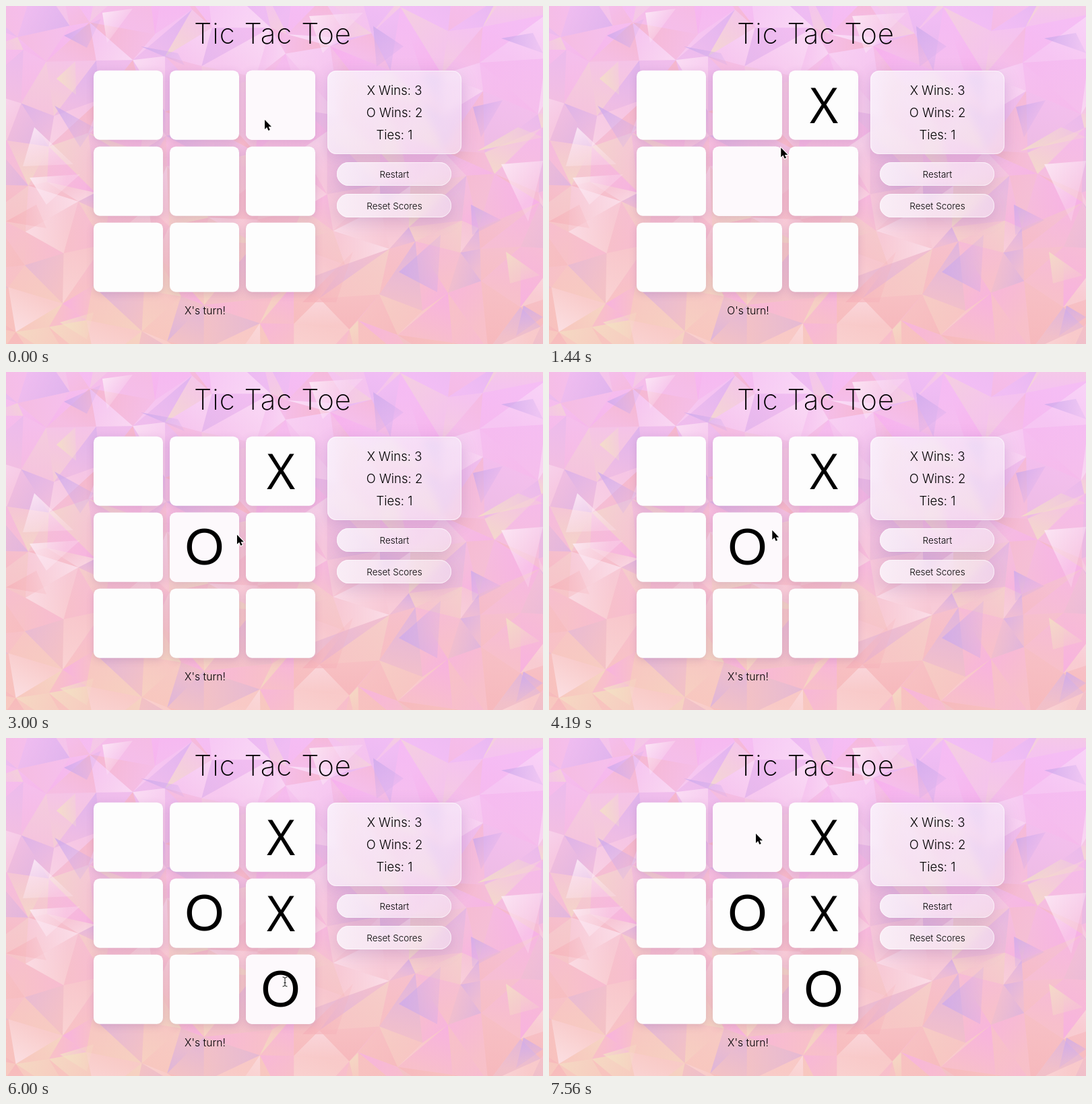
Recreate the animation shown at these times as an HTML page with a canvas. Size 797 by 502 pixels, loop 8 s.

```html
<!DOCTYPE html>
<html lang="en">
<head>
<meta charset="utf-8">
<title>Tic Tac Toe</title>
<style>
html, body { margin: 0; width: 100%; height: 100%; overflow: hidden; background: #f5c4e2; }
canvas { display: block; }
</style>
</head>
<body>
<canvas id="stage" width="797" height="502"></canvas>
<script>
const W = 797, H = 502, LOOP = 8000;
const CELL = 103, PITCH = 113, LEFT = 130, TOP = 96;
const ctx = document.getElementById('stage').getContext('2d');

const TINTS = {
  lavender: '205,170,236', yellow: '243,226,196', white: '253,238,248',
  pink: '248,170,236', salmon: '246,178,186'
};
// Prominent facets, six coordinates each
const FACETS = {
  lavender: [86,44,141,19,120,62, 200,60,265,88,255,70, 72,148,130,180,110,210,
    545,30,590,60,550,90, 735,48,782,40,797,70, 693,150,737,140,705,195,
    583,395,645,340,640,425, 690,295,735,318,692,340, 768,445,797,462,757,490],
  yellow: [75,108,103,82,104,132, 700,215,760,180,797,195,
    742,365,792,400,748,412, 80,470,130,455,120,495],
  white: [143,10,188,4,150,55, 42,180,100,235,25,238, 35,255,110,250,60,295,
    450,15,530,10,470,70, 735,235,797,230,775,320],
  salmon: [0,320,45,295,60,330, 440,440,515,365,490,440]
};
const MOVES = [ // click time, column, row, mark
  [250, 2, 0, 'X'], [1810, 1, 1, 'O'], [5000, 2, 1, 'X'], [5940, 2, 2, 'O']
];
const POINTER = [ // time, x, y
  [0, 384, 169], [1000, 384, 169], [1750, 321, 235], [2350, 321, 235],
  [2630, 345, 243], [2960, 345, 243], [3130, 331, 235], [4170, 331, 235],
  [4690, 400, 260], [5270, 400, 260], [5750, 414, 362], [6770, 414, 362],
  [7560, 307, 142], [LOOP, 307, 142]
];

let seed = 29;
const random = () => (seed = (seed * 16807) % 2147483647) / 2147483647;

function layer(draw) {
  const canvas = document.createElement('canvas');
  canvas.width = W;
  canvas.height = H;
  draw(canvas.getContext('2d'));
  return canvas;
}

function gradient(c, x0, y0, x1, y1, ...colors) {
  const g = c.createLinearGradient(x0, y0, x1, y1);
  colors.forEach((color, i) => g.addColorStop(i / (colors.length - 1), color));
  return g;
}

function facet(c, a, b, d, tint, alpha) {
  c.fillStyle = gradient(c, a[0], a[1], (b[0] + d[0]) / 2, (b[1] + d[1]) / 2,
    `rgba(${TINTS[tint]},${alpha})`, `rgba(${TINTS[tint]},${alpha * 0.3})`);
  c.beginPath();
  for (const p of [a, b, d]) c.lineTo(...p);
  c.fill();
}

function drawMesh(c) {
  c.fillStyle = gradient(c, 430, 0, 370, H, '#f5bff5', '#f5c0eb', '#f5c0d8', '#f7c2c8', '#f8c5bf');
  c.fillRect(0, 0, W, H);
  const size = 58, names = Object.keys(TINTS), grid = [];
  for (let j = 0; j < 12; j++) {
    grid.push([]);
    for (let i = 0; i < 17; i++) {
      grid[j].push([(i - 1 + random() * 0.85) * size, (j - 1 + random() * 0.85) * size]);
    }
  }
  for (let j = 0; j < 11; j++) {
    for (let i = 0; i < 16; i++) {
      let quad = [grid[j][i], grid[j][i + 1], grid[j + 1][i + 1], grid[j + 1][i]];
      if (random() < 0.5) quad = [...quad.slice(1), quad[0]];
      const [p, q, r, s] = quad;
      for (const tri of [[p, q, r], [r, s, p]]) {
        facet(c, ...tri, names[Math.floor(random() * names.length)], 0.2 + random() * 0.5);
      }
    }
  }
  for (const [tint, n] of Object.entries(FACETS)) {
    for (let i = 0; i < n.length; i += 6) {
      facet(c, n.slice(i, i + 2), n.slice(i + 2, i + 4), n.slice(i + 4, i + 6), tint, 0.8);
    }
  }
}

function roundRect(c, x, y, w, h, r) {
  c.beginPath();
  c.roundRect(x, y, w, h, r);
}

function shadowed(c, color, blur, y, draw) {
  c.save();
  c.shadowColor = color;
  c.shadowBlur = blur;
  c.shadowOffsetY = y;
  draw();
  c.restore();
}

function glass(c, x, y, w, h, r) {
  shadowed(c, 'rgba(90,60,150,.2)', 24, 6, () => {
    c.fillStyle = '#f3dcf0';
    roundRect(c, x, y, w, h, r);
    c.fill();
  });
  c.save();
  c.clip();
  c.filter = 'blur(6px)';
  c.drawImage(mesh, 0, 0);
  c.restore();
  c.fillStyle = gradient(c, x, y, x + w, y + h, 'rgba(250,247,253,.82)', 'rgba(243,232,248,.5)');
  c.fill();
  c.strokeStyle = 'rgba(255,255,255,.6)';
  roundRect(c, x + 0.5, y + 0.5, w - 1, h - 1, r);
  c.stroke();
}

function label(c, text, x, y, size, weight = 300, family = 'Inter', spacing = 0) {
  c.font = `${weight} ${size}px ${family}, sans-serif`;
  c.letterSpacing = spacing + 'px';
  c.textAlign = 'center';
  c.fillStyle = '#000';
  c.fillText(text, x, y);
}

function cell(c, col, row, color) {
  roundRect(c, LEFT + col * PITCH, TOP + row * PITCH - 0.3, CELL, CELL, 9);
  c.fillStyle = color;
  c.fill();
}

const mesh = layer(drawMesh);
const board = layer(c => {
  c.drawImage(mesh, 0, 0);
  for (let i = 0; i < 9; i++) {
    shadowed(c, 'rgba(120,70,140,.2)', 12, 3, () => cell(c, i % 3, Math.floor(i / 3), '#fdfdfd'));
  }
  glass(c, 477, 96, 199, 124, 13);
  glass(c, 491, 232, 170, 35, 17.5);
  glass(c, 491, 279, 170, 35, 17.5);
  label(c, 'Tic Tac Toe', 396, 56, 42, 200, 'Inter', 1);
  ['X Wins: 3', 'O Wins: 2', 'Ties: 1'].forEach((s, i) => label(c, s, 576.5, 131.5 + i * 33, 18.5));
  label(c, 'Restart', 576.5, 254.5, 13.5);
  label(c, 'Reset Scores', 576.5, 301.5, 13.5);
});

function pointerAt(t) {
  const i = POINTER.findIndex(k => k[0] > t);
  const [t0, x0, y0] = POINTER[i - 1], [t1, x1, y1] = POINTER[i];
  const u = (t - t0) / (t1 - t0), e = u * u * (3 - 2 * u);
  return [x0 + (x1 - x0) * e, y0 + (y1 - y0) * e];
}

function strokeTwice(path, width) {
  ctx.strokeStyle = 'rgba(255,255,255,.8)';
  ctx.lineWidth = width + 1.4;
  ctx.stroke(path);
  ctx.strokeStyle = '#111';
  ctx.lineWidth = width;
  ctx.stroke(path);
}

const ARROW = new Path2D('M0 0V14L3.2 11L5.4 16L7.8 15L5.6 10.3H10Z');
const BEAM = new Path2D('M-3.5 -7Q0 -7 0 -5Q0 -7 3.5 -7M0 -5V5M-3.5 7Q0 7 0 5Q0 7 3.5 7M-1.5 1.5H1.5');

function drawPointer(x, y, overText) {
  ctx.save();
  ctx.translate(x, y);
  if (overText) {
    strokeTwice(BEAM, 1);
  } else {
    ctx.strokeStyle = '#fff';
    ctx.lineWidth = 2;
    ctx.stroke(ARROW);
    ctx.fillStyle = '#000';
    ctx.fill(ARROW);
  }
  ctx.restore();
}

function render() {
  const t = performance.now() % LOOP;
  const [x, y] = pointerAt(t);
  const played = MOVES.filter(m => t >= m[0]);
  ctx.drawImage(board, 0, 0);

  const col = Math.floor((x - LEFT) / PITCH), row = Math.floor((y - TOP) / PITCH);
  if ((x - LEFT) % PITCH < CELL && (y - TOP) % PITCH < CELL) cell(ctx, col, row, '#fdf9fc');

  let overText = false;
  for (const [, c, r, mark] of played) {
    const cx = LEFT + CELL / 2 + c * PITCH, cy = TOP + CELL / 2 + r * PITCH;
    if (mark === 'X') label(ctx, mark, cx + 26 - 25.5, cy + 26.5, 73, 400, '"Open Sans"');
    else label(ctx, mark, cx, cy + 25.8, 73, 400, 'Lato');
    if (Math.abs(x - cx) < (mark === 'X' ? 21 : 28) && Math.abs(y - cy) < 50) overText = true;
  }
  label(ctx, (played.length % 2 ? 'O' : 'X') + "'s turn!", 295.5, 458, 15.7);
  drawPointer(x, y, overText);
  requestAnimationFrame(render);
}
render();
</script>
</body>
</html>
```
